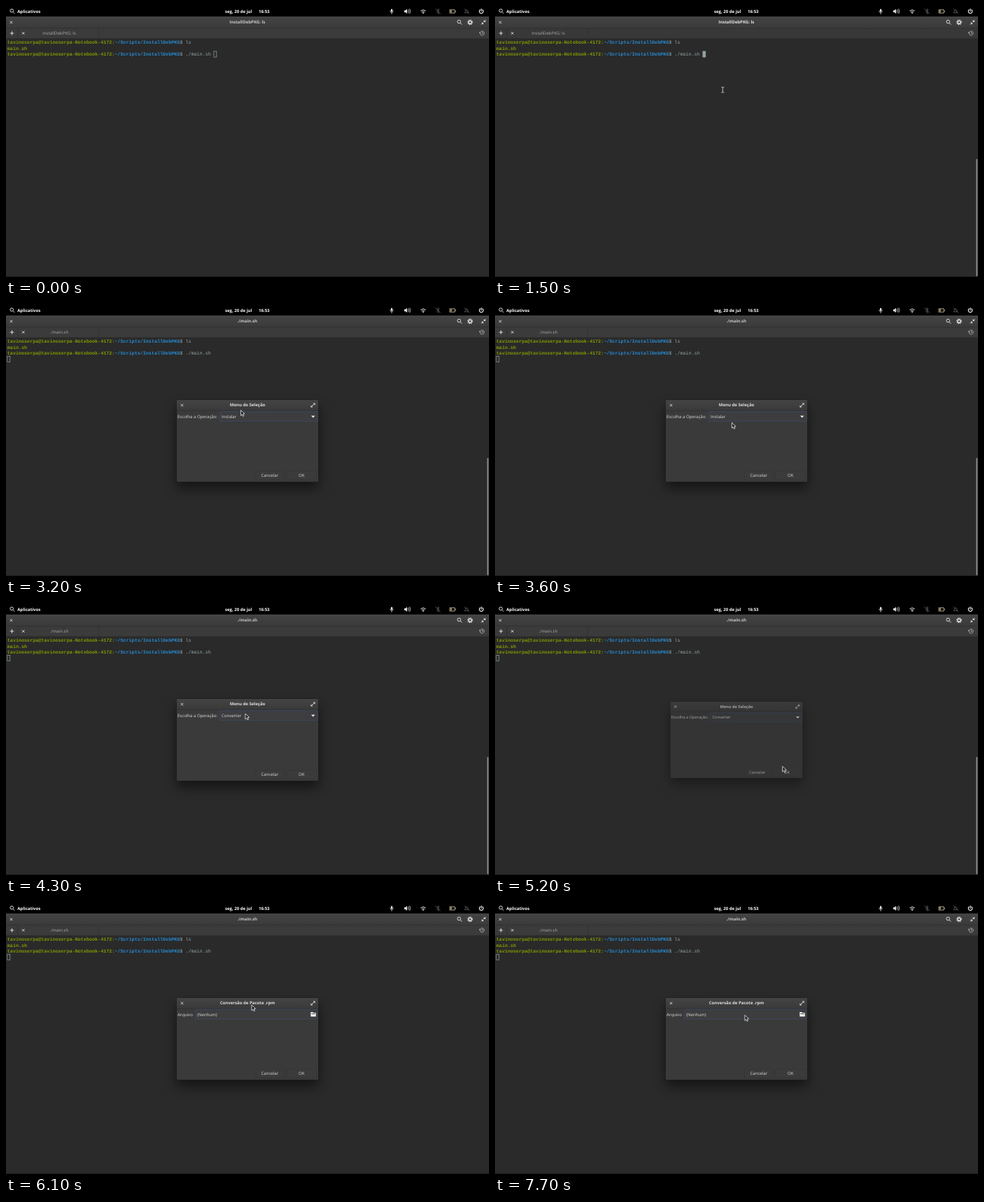
An HTML page that plays this animation: 690 by 388 pixels, repeating every 8000 ms.

```html
<!DOCTYPE html>
<html lang="pt">
<head>
<meta charset="utf-8">
<title>Terminal</title>
<style>
  html, body { margin: 0; width: 100%; height: 100%; overflow: hidden; background: #000; }
  svg { display: block; width: 690px; height: 388px; }
  text { font: 6.06px "Open Sans", sans-serif; fill: #dcdcdc; text-rendering: geometricPrecision; white-space: pre; }
  .b { font-weight: 700; }
  .mid { text-anchor: middle; }
  .panel { fill: #fff; }
  .term text { font: 6.745px "Liberation Mono", monospace; fill: #94a3a5; }
  .term .u { font-weight: 700; fill: #859900; }
  .term .p { font-weight: 700; fill: #268bd2; }
  .line { fill: none; stroke: #dedede; stroke-width: 1; }
  .dim { opacity: .42; }
  .focus { fill: #3d3d3f; stroke: #3d4b6c; stroke-width: .7; }
  .btn { fill: #3b3b3b; stroke: #353535; stroke-width: .6; }
</style>
</head>
<body>
<svg viewBox="0 0 690 388">
  <defs>
    <linearGradient id="bar" x2="0" y2="1">
      <stop stop-color="#444"/><stop offset="1" stop-color="#3a3a3a"/>
    </linearGradient>
    <filter id="blur" x="-30%" y="-40%" width="160%" height="180%">
      <feGaussianBlur stdDeviation="9"/>
    </filter>
    <path id="x" d="M-1.7-1.7 1.7 1.7M-1.7 1.7 1.7-1.7" class="line"/>
    <g id="lens" class="line"><circle cx="-.8" cy="-.8" r="2.3"/><path d="M.9.9 3.3 3.3"/></g>
  </defs>

  <!-- panel -->
  <rect width="690" height="15"/>
  <use href="#lens" x="9" y="7.5"/>
  <text class="b panel" x="16.2" y="9.5">Aplicativos</text>
  <text class="b panel" x="313" y="9.5">seg, 20 de jul</text>
  <text class="b panel" x="361" y="9.5">16:53</text>
  <g class="line" stroke-linecap="round">
    <rect x="549.9" y="4.2" width="2.2" height="4.4" rx="1.1" fill="#eee" stroke="none"/>
    <path d="M548.8 7.2a2.2 2.2 0 0 0 4.4 0M551 9.6v1.8" stroke-width=".8"/>
    <path d="M569 6.3h1.6l2.2-2v6.6l-2.2-2H569z" fill="#eee" stroke="none"/>
    <path d="M574 6.1q1 1.4 0 2.9M575.4 5q1.8 2.6 0 5.1M576.9 4.2q2.2 3.4 0 6.7" stroke-width=".7"/>
    <path d="M592.7 6.7q3.3-2.6 6.6 0M594 8.4q2-1.5 4 0"/>
    <circle cx="596" cy="10" r=".9" fill="#eee" stroke="none"/>
    <g class="dim" stroke-width=".8">
      <path d="M615.2 5.6l4 3.9-2 1.8V3.9l2 1.8-4 3.8M613.5 4l7 7"/>
      <path d="M655.4 9.7h5.4q-1-1-1-3a1.8 1.8 0 0 0-3.4 0q0 2-1 3zM654.8 4l7 7"/>
    </g>
    <path d="M634.3 5.3h6.8v4.8h-6.8zM642.2 6.9v1.6" stroke="#cfcbb4" stroke-width=".8"/>
    <rect x="635" y="6" width="1.6" height="3.4" fill="#c9b45c" stroke="none"/>
    <path d="M677.2 5.5a2.8 2.8 0 1 0 3.6 0M679 4v3.4" stroke="#fff" stroke-width="1.1"/>
  </g>

  <!-- terminal window -->
  <rect y="15" width="690" height="373" fill="#2a2a2a"/>
  <rect y="15" width="690" height="17" fill="url(#bar)"/>
  <rect id="tabs" y="32" width="690" height="14.5"/>
  <path d="M0 31.8H690M0 46.4H690M16.8 32v14M132.3 32v14" stroke="#2f2f2f" stroke-width=".7"/>
  <path d="M0 387.5H690" stroke="#1c1c1c"/>
  <use href="#x" x="7.5" y="23.4"/>
  <text id="title" class="b mid" x="344.8" y="25.3"></text>
  <use href="#lens" x="648" y="23.3"/>
  <g class="line">
    <circle cx="663" cy="23.3" r="2.1" stroke-width="1.5"/>
    <circle cx="663" cy="23.3" r="3.4" stroke-width="1.2" stroke-dasharray="1.35 1.32"/>
    <path d="M685.5 20 683 22.5M679 26.5 681.5 24"/>
    <path d="M682.6 20v3h3zM679 23.8h3v3z" fill="#dedede" stroke="none"/>
    <path d="M8.5 36.3v5.4M5.8 39h5.4"/>
    <path d="M677.6 37.4a3 3 0 1 1-.3 2.5M680.4 37.2v2h1.5" stroke-width=".8" stroke="#bbb"/>
    <path d="M676.3 36.6v2.6h2.6z" fill="#bbb" stroke="none"/>
  </g>
  <use href="#x" x="24.7" y="39"/>
  <text id="tab" class="mid" x="76" y="41.3" style="fill:#aaa"></text>

  <g class="term">
    <rect id="caret" width="3.9" height="8.2" stroke="#94a3a5" stroke-width=".7"/>
    <text x="1.8" y="54"><tspan class="u">tavinoserpa@tavinoserpa-Notebook-4172:</tspan><tspan class="p">~/Scripts/InstallDebPKG</tspan>$ ls</text>
    <text class="u" x="1.8" y="62.6">main.sh</text>
    <text x="1.8" y="71.2"><tspan class="u">tavinoserpa@tavinoserpa-Notebook-4172:</tspan><tspan class="p">~/Scripts/InstallDebPKG</tspan>$ ./main.sh</text>
  </g>
  <rect id="scroll" x="687.3" y="219" width="2" height="168" rx="1" fill="#888"/>

  <!-- dialog -->
  <g id="dialog">
    <rect x="244" y="146" width="202" height="116" opacity=".55" filter="url(#blur)"/>
    <rect x="243.6" y="135.6" width="202.8" height="117.8" rx="1.5" fill="#1f1f1f"/>
    <rect x="244" y="136" width="202" height="117" rx="1.2" fill="#3a3a3a"/>
    <rect x="244" y="136" width="202" height="15" rx="1.2" fill="url(#bar)"/>
    <path d="M244 151.2h202" stroke="#2e2e2e" stroke-width=".6"/>
    <use href="#x" x="251.5" y="143.5"/>
    <g class="line">
      <path d="M436.5 145.5 440.5 141.5"/>
      <path d="M438.6 140.6h3v3zM435.4 143.6v3h3z" fill="#dedede" stroke="none"/>
    </g>
    <text id="head" class="b mid" x="345" y="145.4"></text>
    <g id="choose">
      <text x="245" y="161.9">Escolha a Operação:</text>
      <rect class="focus" x="305" y="152.6" width="140.3" height="14" rx="1.2"/>
      <text id="value" x="308" y="161.9"></text>
      <path d="M435.9 158.6h5.6l-2.8 2.9z" fill="#eee"/>
    </g>
    <g id="file">
      <text x="245" y="161.5">Arquivo</text>
      <rect class="focus" x="270.5" y="152.3" width="174.8" height="13.8" rx="1.2"/>
      <text x="273.2" y="161.5">(Nenhum)</text>
      <path d="M435.3 156.3h3l.8.9h3.6v5.3h-7.4z" fill="#fff"/>
      <path d="M436.2 158.2h5.6v1h-5.6z" fill="#333"/>
    </g>
    <rect class="btn" x="357" y="238" width="40" height="12.5" rx="1.2"/>
    <rect class="btn" x="401" y="238" width="42.5" height="12.5" rx="1.2"/>
    <text class="mid" x="376.8" y="246.2">Cancelar</text>
    <text class="mid" x="422.3" y="246.2">OK</text>
  </g>

  <!-- pointers -->
  <path id="beam" d="M-2-4Q0-4 0-2.8 0-4 2-4M0-3.2V3.2M-2 4Q0 4 0 2.8 0 4 2 4" fill="none" stroke="#c4c4c4" stroke-width="1"/>
  <path id="arrow" d="M.4.5V8.3L2.2 6.7 3.5 9.4 4.9 8.7 3.6 6 6 5.8z" fill="#222" stroke="#eee" stroke-width=".8"/>
</svg>
<script>
const LOOP = 8000, STEP = 100;
const $ = id => document.getElementById(id);
const show = (id, on) => $(id).setAttribute('visibility', on ? 'visible' : 'hidden');
const set = (id, attrs) => { for (const k in attrs) $(id).setAttribute(k, attrs[k]); };
const clamp = v => Math.min(1, Math.max(0, v));
const outExpo = p => p >= 1 ? 1 : 1 - 2 ** (-10 * p);

// pointer stops: time, x, y
const path = [
  [1100, 400, 70], [1400, 325.3, 120], [2800, 325.3, 120], [3200, 335, 150],
  [3600, 338, 168], [3900, 338, 168], [4200, 341.5, 156.5], [4400, 341.5, 156.5],
  [4800, 411, 233], [5000, 415, 240], [5300, 408.7, 229], [5700, 408.7, 229],
  [6100, 350.5, 145.5], [6500, 350.5, 145.5], [6800, 330, 143], [7100, 360, 141],
  [7400, 346, 146], [7700, 356.5, 160]
];

function pointerAt(t) {
  const i = path.findIndex(s => s[0] > t);
  if (i < 0) return path[path.length - 1].slice(1);
  if (i === 0) return path[0].slice(1);
  const [a, b] = [path[i - 1], path[i]];
  const p = (t - a[0]) / (b[0] - a[0]), e = p * p * (3 - 2 * p);
  return [1, 2].map(k => a[k] + (b[k] - a[k]) * e);
}

// scale about a point
function zoom(sx, sy, cx, cy) {
  return `translate(${cx} ${cy}) scale(${sx} ${sy}) translate(${-cx} ${-cy})`;
}

function drawDialog(t) {
  const second = t >= 5600, open = second ? 5672 : 2772;
  const grow = outExpo(clamp((t - open) / 250));
  const fade = second ? 0 : clamp((t - 5150) / 150);
  show('dialog', t >= open && fade < 1);
  set('dialog', {
    opacity: grow * (1 - fade),
    transform: fade
      ? zoom(1 - .2 * fade, 1 - .2 * fade, 345, 194.5)
      : zoom(.01 + .99 * grow, .1 + .9 * grow, 345, 299)
  });
  $('head').textContent = second ? 'Conversão de Pacote .rpm' : 'Menu de Seleção';
  $('value').textContent = t < 4200 ? 'Instalar' : 'Converter';
  $('choose').style.display = second ? 'none' : '';
  $('file').style.display = second ? '' : 'none';
}

function drawTerminal(t) {
  const running = t >= 2500;
  const focused = (t >= 1100 && t < 2800) || (t >= 5300 && t < 5700);
  const blinkOff = t >= 1700 && t < 2300;
  const name = running ? './main.sh' : 'InstallDebPKG: ls';
  $('title').textContent = $('tab').textContent = name;
  $('title').style.fill = focused ? '#e2e2e2' : '#c6c6c6';
  set('tabs', { fill: focused ? '#383838' : '#3b3b3b' });
  set('caret', {
    x: running ? 1.9 : 296.9,
    y: running ? 73.4 : 64.9,
    fill: focused ? '#94a3a5' : 'none'
  });
  show('caret', !blinkOff);
  set('scroll', { opacity: t < 1100 ? 0 : 1 - clamp((t - 5700) / 300) });
}

function drawPointer(t) {
  const [x, y] = pointerAt(t), transform = `translate(${x} ${y})`;
  show('beam', t >= 1100 && t < 2800);
  show('arrow', t >= 2800);
  set('beam', { transform });
  set('arrow', { transform });
}

const start = performance.now();
function frame() {
  const now = (performance.now() - start) % LOOP;
  const t = Math.floor(now / STEP) * STEP; // the screen updates ten times a second
  drawTerminal(t);
  drawDialog(t);
  drawPointer(t);
  requestAnimationFrame(frame);
}
frame();
</script>
</body>
</html>
```
